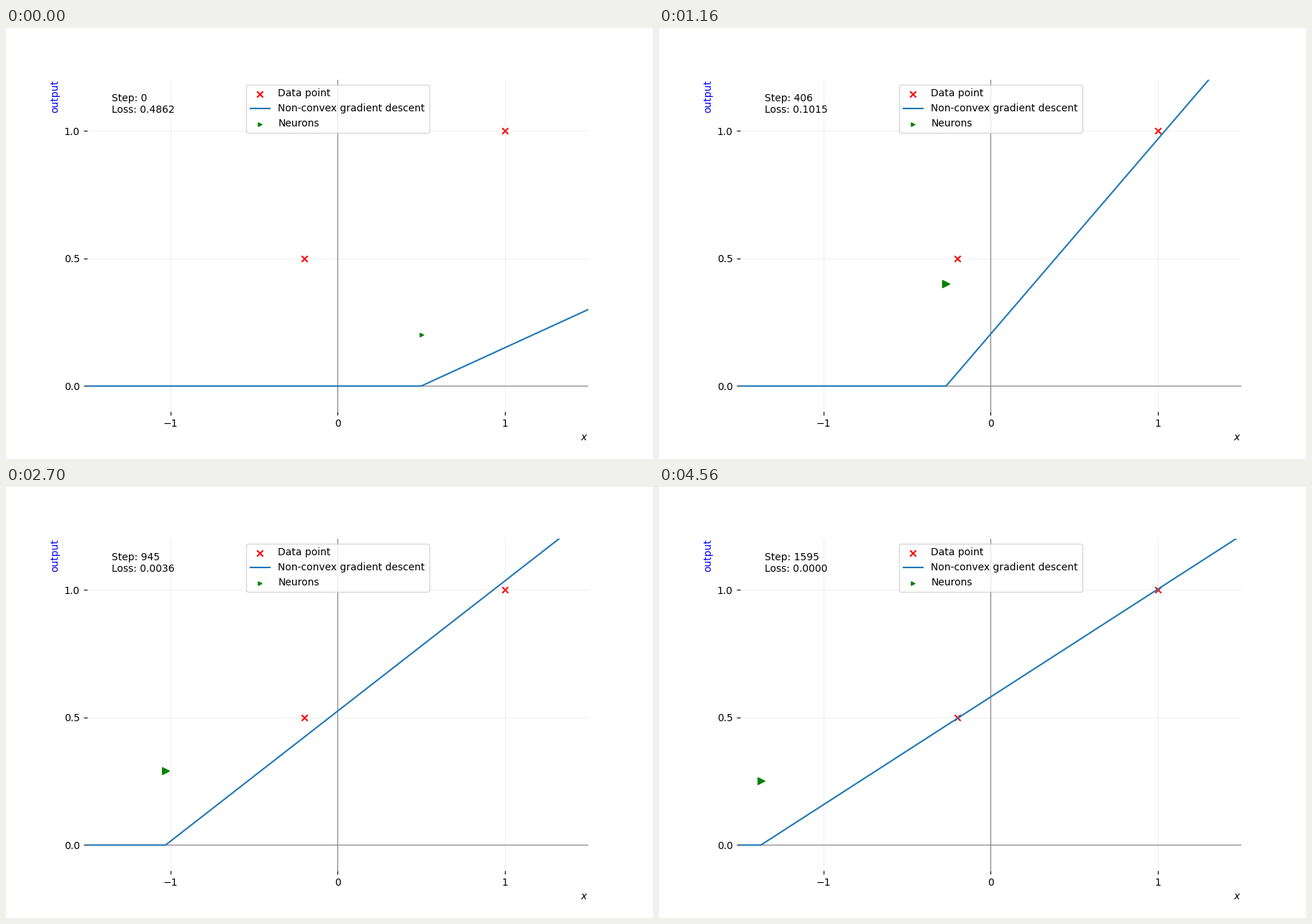
A matplotlib script for the animation above (4580 ms loop, 900 by 600 pixels).

```python
import numpy as np
import matplotlib.pyplot as plt
from matplotlib.animation import FuncAnimation

FRAMES, INTERVAL = 229, 20
STRIDE, LAST_STEP = 7, 1595

X = np.array([-0.2, 1.0])
Y = np.array([0.5, 1.0])


def train(steps, lr=0.001, beta1=0.9, beta2=0.999, eps=1e-8):
    """Fit a * relu(w * x + b) to the data with Adam; return all states."""
    theta = np.array([0.3, -0.15, 1.0])
    m, v = np.zeros(3), np.zeros(3)
    history = []
    for t in range(1, steps + 2):
        w, b, a = theta
        hidden = np.maximum(w * X + b, 0)
        error = a * hidden - Y
        history.append((w, b, a, np.mean(error ** 2)))
        back = error * a * (hidden > 0)
        grad = np.array([back @ X, back.sum(), error @ hidden])
        m = beta1 * m + (1 - beta1) * grad
        v = beta2 * v + (1 - beta2) * grad ** 2
        m_hat, v_hat = m / (1 - beta1 ** t), v / (1 - beta2 ** t)
        theta = theta - lr * m_hat / (np.sqrt(v_hat) + eps)
    return history


def neuron_size(slope, kink):
    return 13 + 90 * (slope * np.hypot(1, kink) - 0.3354)


history = train(LAST_STEP)

fig, ax = plt.subplots(figsize=(9, 6), dpi=100)
ax.set_xlim(-1.5, 1.5)
ax.set_ylim(-0.1, 1.2)
ax.set_xticks([-1, 0, 1])
ax.set_yticks([0, 0.5, 1])
ax.spines[:].set_visible(False)
ax.grid(alpha=0.2)
ax.axhline(0, color="gray", lw=0.8)
ax.axvline(0, color="gray", lw=0.8)
ax.set_xlabel("$x$", loc="right")
ax.set_ylabel("output", loc="top", color="blue")

ax.scatter(X, Y, marker="x", color="red", label="Data point")
curve, = ax.plot([], [], color="C0", label="Non-convex gradient descent")
neuron = ax.scatter([0.5], [0.2], s=13, marker=">", color="green",
                    label="Neurons")
ax.legend(loc="upper center")
info = ax.text(0.05, 0.9, "", transform=ax.transAxes)


def update(i):
    step = min(i * STRIDE, LAST_STEP)
    w, b, a, loss = history[step]
    slope, kink = a * w, -b / w
    curve.set_data([-1.5, kink, 1.5], [0, 0, slope * (1.5 - kink)])
    neuron.set_offsets([[kink, 0.2 + 0.431 * (slope - 0.3)]])
    neuron.set_sizes([neuron_size(slope, kink)])
    info.set_text(f"Step: {step}\nLoss: {loss:.4f}")
    return curve, neuron, info


anim = FuncAnimation(fig, update, frames=FRAMES, interval=INTERVAL,
                     repeat=True, repeat_delay=0)
plt.show()
```
